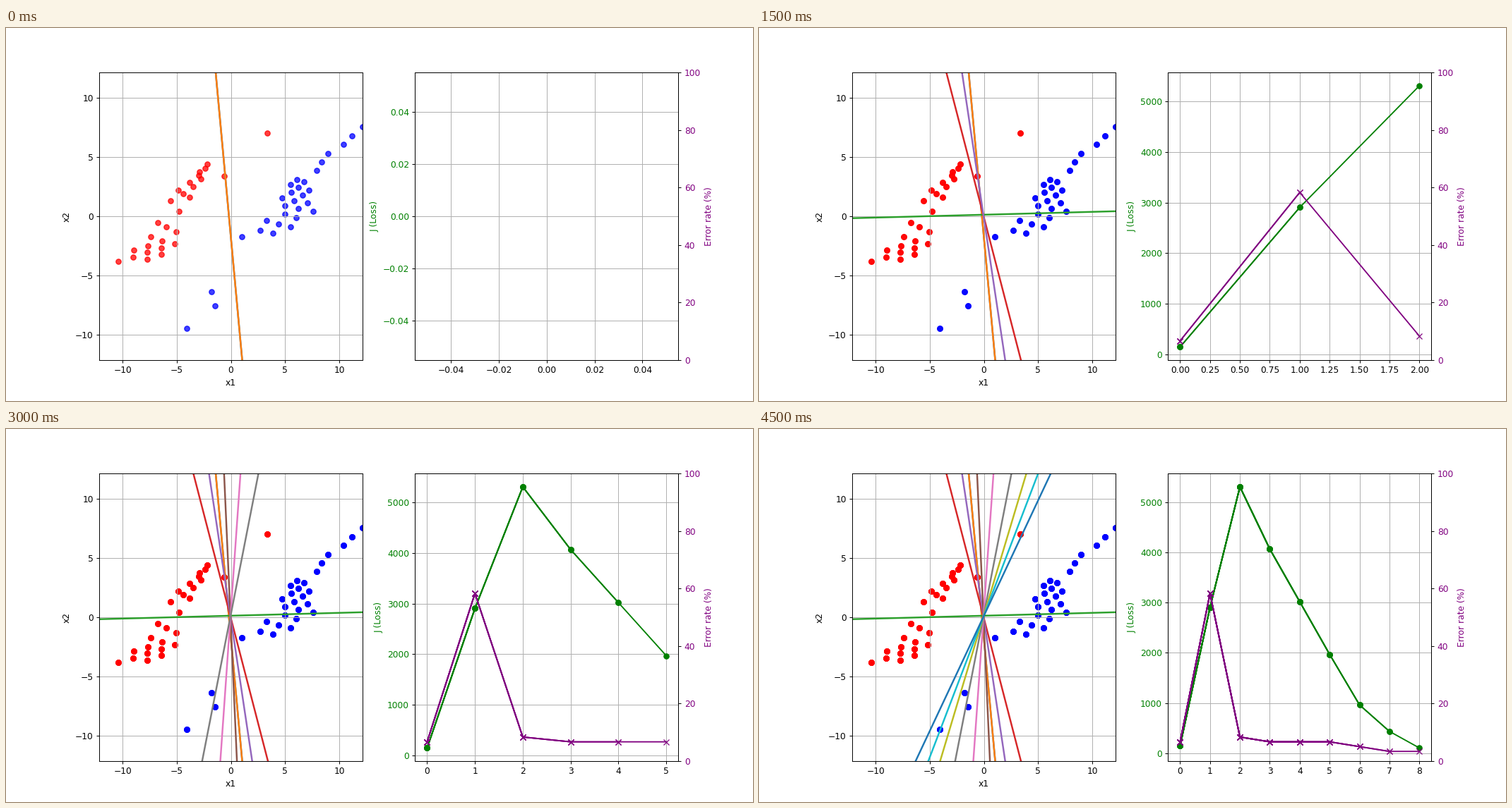
Recreate the animation shown at these times as a matplotlib script. Size 1058x529 px, loop 5 s.

```python
import matplotlib.pyplot as plt
import numpy as np
from matplotlib.animation import FuncAnimation

FRAMES = 10
INTERVAL = 500
LIM = 12.14


def band(knots, xs, ys):
    """Points along a path, spread sideways by a golden-ratio sequence."""
    i = np.arange(knots[-1] + 1)
    spread = 2 * (1 - (i / knots[-1]) ** 2)
    x = np.interp(i, knots, xs) + spread * (2 * (i * 0.618 % 1) - 1)
    return np.column_stack([x, np.interp(i, knots, ys)])


# Each class is a band plus the few points that are hard to separate;
# the last two red ones lie outside the view.
RED = np.vstack([
    band([0, 9, 13, 15, 25], [-8.4, -6.6, -5.4, -5, -2.2],
         [-3.8, -2.1, -0.5, 1.3, 4.4]),
    [(3.34, 7.07), (-0.63, 3.39), (-16, -7.8), (-13.56, -6.68)],
])
BLUE = np.vstack([
    band([0, 8, 20, 26], [3, 6, 6.3, 12.14], [-1.7, 0.45, 3.13, 7.55]),
    [(-1.77, -6.39), (-1.49, -7.54), (-4.07, -9.49)],
])


def train(w, steps):
    """Batch perceptron: weights, loss and error rate at every step."""
    points = np.vstack([RED, BLUE])
    sign = np.repeat([-1, 1], [len(RED), len(BLUE)])
    signed = np.column_stack([points, np.ones(len(points))]) * sign[:, None]
    weights, losses, errors = [], [], []
    for _ in range(steps):
        score = signed @ w
        wrong = score < 0
        weights.append(w)
        losses.append(-score[wrong].sum())
        errors.append(100 * wrong.mean())
        w = w + signed[wrong].sum(axis=0)
    return weights, losses, errors


WEIGHTS, LOSSES, ERRORS = train(np.array([11.38, 1.145, 2.1]), FRAMES)

fig = plt.figure(figsize=(12, 6), dpi=529 / 6)


def draw_boundaries(ax, step):
    ax.set(xlim=(-LIM, LIM), ylim=(-LIM, LIM), xlabel="x1", ylabel="x2")
    ax.grid(True)
    # The first boundary is drawn twice; the points grow denser every time
    for i, (a, b, c) in enumerate(WEIGHTS[:1] + WEIGHTS[:step + 1]):
        ax.scatter(*RED.T, color="red", alpha=0.5)
        ax.scatter(*BLUE.T, color="blue", alpha=0.5)
        ax.axline((0, -c / b), slope=-a / b, color=f"C{i % 10}", linewidth=2)
    ax.set(xlim=(-LIM, LIM), ylim=(-LIM, LIM))


def draw_curves(ax, step):
    twin = ax.twinx()
    ax.grid(True)
    # Every step redraws the whole history on top of the earlier curves
    for n in range(step + 1):
        ax.plot(range(n), LOSSES[:n], color="green", marker="o")
        twin.plot(range(n), ERRORS[:n], color="purple", marker="x")
    ax.set_ylabel("J (Loss)", color="green")
    ax.tick_params(axis="y", labelcolor="green")
    twin.set_ylim(0, 100)
    twin.set_ylabel("Error rate (%)", color="purple")
    twin.tick_params(axis="y", labelcolor="purple")


def update(step):
    fig.clear()
    left, right = fig.subplots(1, 2)
    draw_boundaries(left, step)
    draw_curves(right, step)
    return []


anim = FuncAnimation(fig, update, frames=FRAMES, interval=INTERVAL, repeat=True)
plt.show()
```
